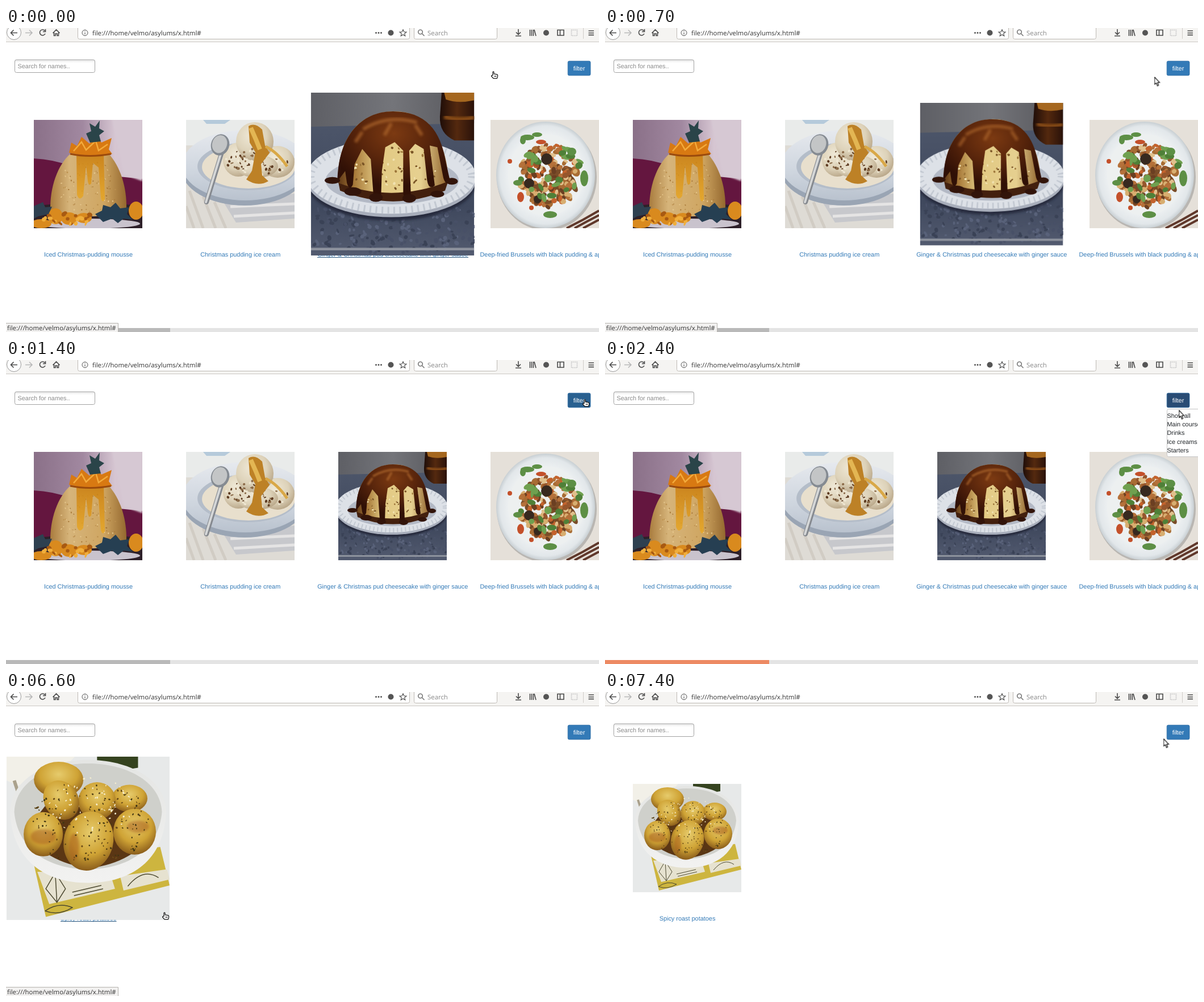
An HTML page for the animation above (8000 ms loop, 1044 px wide and 536 px high).

```html
<!DOCTYPE html>
<html lang="en">
<head>
<meta charset="utf-8">
<title>Recipe gallery</title>
<style>
html, body { margin: 0; width: 100%; height: 100%; overflow: hidden; background: #fff; }
svg { display: block; }
text { font: 10.9px "Liberation Sans", Arial, sans-serif; text-rendering: geometricPrecision; }
.ui { font: 500 11.4px "Open Sans", "Noto Sans", sans-serif; fill: #333; }
.link { fill: #337ab7; }
.mid { text-anchor: middle; }
.icon { fill: none; stroke: #4a4a4a; stroke-width: 1.6; }
.anim { animation: 8s step-end infinite; }

#gallery { animation-name: gallery; }
#result { animation-name: result; }
#status { animation-name: status; }
#menu { animation-name: menu; }
#button { animation-name: button; }
#thumb { animation-name: thumb; }
#cake { animation-name: cake; transform-origin: 680.5px 257.5px; }
#roast { animation-name: roast; transform-origin: 144.5px 257.5px; }
#cakeLine { animation-name: cakeLine; }
#roastLine { animation-name: roastLine; }
#pointer { animation-name: move; }
#hand { animation-name: hand; }
#arrow { animation-name: arrow; }

@keyframes gallery { 0% { opacity: 1 } 80%, 100% { opacity: 0 } }
@keyframes result { 0% { opacity: 0 } 80%, 100% { opacity: 1 } }
@keyframes status { 0% { opacity: 1 } 15% { opacity: 0 } 80% { opacity: 1 } 87.5% { opacity: .5 } 90%, 100% { opacity: 0 } }
@keyframes menu { 0% { opacity: 0 } 22.5% { opacity: 1 } 80%, 100% { opacity: 0 } }
@keyframes button { 0% { fill: #337ab7 } 13.75% { fill: #286090 } 22.5% { fill: #294c74 } 80%, 100% { fill: #337ab7 } }
@keyframes thumb { 0% { fill: #b9b9b9 } 23.75%, 100% { fill: #ed8a63 } }
@keyframes cake {
  0% { transform: scale(1.503) } 3.75% { transform: scale(1.48) } 7.5% { transform: scale(1.43) }
  8.75% { transform: scale(1.316) } 10% { transform: scale(1.12) } 11.25%, 100% { transform: scale(1) }
}
@keyframes roast { 0% { transform: scale(1.503) } 85% { transform: scale(1.073) } 87.5%, 100% { transform: scale(1) } }
@keyframes cakeLine { 0% { opacity: 1 } 3.75%, 100% { opacity: 0 } }
@keyframes roastLine { 0% { opacity: 1 } 85%, 100% { opacity: 0 } }
@keyframes move {
  0% { transform: translate(854px, 76px) }
  3.75% { transform: translate(1019.5px, 66.5px) }
  7.5% { transform: translate(985.5px, 84.5px) }
  8.75% { transform: translate(967.5px, 86.5px) }
  10% { transform: translate(997.5px, 87.5px) }
  11.25% { transform: translate(1022.5px, 86.5px) }
  12.5% { transform: translate(1025.5px, 85.5px) }
  13.75% { transform: translate(1020px, 77px) }
  15% { transform: translate(1018px, 73px) }
  16.25% { transform: translate(1016px, 71px) }
  17.5% { transform: translate(1015px, 69px) }
  27.5% { transform: translate(1013px, 74px) }
  28.75% { transform: translate(1010.5px, 85.5px) }
  30% { transform: translate(1010.5px, 88.5px) }
  80% { transform: translate(152px, 277px) }
  82.5% { transform: translate(275px, 388px) }
  85% { transform: translate(881.5px, 136.5px) }
  90% { transform: translate(956.5px, 99.5px) }
  92.5%, 100% { transform: translate(983.5px, 82.5px) }
}
@keyframes hand {
  0% { opacity: 1 } 3.75% { opacity: 0 } 13.75% { opacity: 1 }
  28.75% { opacity: 0 } 80% { opacity: 1 } 85%, 100% { opacity: 0 }
}
@keyframes arrow {
  0% { opacity: 0 } 3.75% { opacity: 1 } 13.75% { opacity: 0 }
  28.75% { opacity: 1 } 80% { opacity: 0 } 85%, 100% { opacity: 1 }
}
</style>
</head>
<body>
<svg width="1044" height="536" viewBox="0 0 1044 536">
<defs>
  <linearGradient id="wall"><stop stop-color="#8a7088"/><stop offset=".45" stop-color="#a188a0"/><stop offset=".75" stop-color="#d6c6d2"/><stop offset="1" stop-color="#d0bfcb"/></linearGradient>
  <linearGradient id="mousse"><stop stop-color="#a97c3e"/><stop offset=".25" stop-color="#d6b47a"/><stop offset=".7" stop-color="#cfa662"/><stop offset="1" stop-color="#94682f"/></linearGradient>
  <linearGradient id="syrup" x2="0" y2="1"><stop stop-color="#c97d10"/><stop offset="1" stop-color="#e8a826"/></linearGradient>
  <linearGradient id="linen" x2="0" y2="1"><stop offset=".2" stop-color="#4c5569"/><stop offset=".7" stop-color="#3f485d"/><stop offset="1" stop-color="#535b70"/></linearGradient>
  <linearGradient id="shade"><stop stop-color="#5e5f65"/><stop offset=".5" stop-color="#74757a"/><stop offset="1" stop-color="#55555a"/></linearGradient>
  <linearGradient id="jar"><stop stop-color="#1f0d08"/><stop offset=".5" stop-color="#54290f"/><stop offset="1" stop-color="#2a120a"/></linearGradient>
  <linearGradient id="cream"><stop stop-color="#5e3716"/><stop offset=".15" stop-color="#a87a3a"/><stop offset=".35" stop-color="#e2c982"/><stop offset=".75" stop-color="#e6d090"/><stop offset="1" stop-color="#8d5f2a"/></linearGradient>
  <radialGradient id="choc" cx=".5" cy=".25" r=".6"><stop stop-color="#7c3a12"/><stop offset=".5" stop-color="#5a260c"/><stop offset="1" stop-color="#301006"/></radialGradient>
  <radialGradient id="scoop" cx=".4" cy=".35" r=".7"><stop stop-color="#efe8d6"/><stop offset=".6" stop-color="#ddd2b9"/><stop offset="1" stop-color="#b5a284"/></radialGradient>
  <linearGradient id="plate" x2="0" y2="1"><stop stop-color="#e6e9ee"/><stop offset=".6" stop-color="#ced5de"/><stop offset="1" stop-color="#b9c2ce"/></linearGradient>
  <radialGradient id="dish"><stop offset=".7" stop-color="#eff2f3"/><stop offset=".92" stop-color="#e2e7ea"/><stop offset="1" stop-color="#c8cfd3"/></radialGradient>
  <radialGradient id="potato" cx=".5" cy=".35" r=".7"><stop stop-color="#e6cb6c"/><stop offset=".55" stop-color="#cfa335"/><stop offset="1" stop-color="#7d4f16"/></radialGradient>
  <linearGradient id="bowl" x2="0" y2="1"><stop stop-color="#e4e5e3"/><stop offset="1" stop-color="#f2f2f1"/></linearGradient>
  <linearGradient id="field" x2="0" y2="1"><stop stop-color="#e6e6e6"/><stop offset=".25" stop-color="#fff"/></linearGradient>
  <filter id="soft"><feGaussianBlur stdDeviation="1.5"/></filter>
</defs>

<!-- browser bar -->
<path d="M0 0H1044V24H0Z" fill="#f5f4f2"/>
<path d="M0 24.5H1044" stroke="#cbc8c4"/>
<g fill="#fff" stroke="#bdb9b4">
  <rect x="126.500" y="-6.500" width="584" height="26" rx="3"/>
  <rect x="718.500" y="-6.500" width="146" height="26" rx="3"/>
  <circle cx="14" cy="8" r="12.500" stroke="#999"/>
</g>
<g class="icon">
  <path d="M20 8.500H9M13.500 3.500 8.500 8.500 13.500 13.500"/>
  <path d="M34 8.500H45M41 3.500 46 8.500 41 13.500" stroke="#b8b8b8"/>
  <path d="M68.500 5A5 5 0 1 0 69 10M69.500 2V6.500H65"/>
  <path d="M82.500 9 88.500 3 94.500 9M84.500 8V13.500H87V10H90V13.500H92.500V8"/>
  <g stroke-width="1"><circle cx="139" cy="8.500" r="5"/><path d="M139 8V11.500M139 5.500V6.800"/></g>
  <path d="M699 2.800 700.700 6.800 705 7.100 701.700 9.800 702.800 14 699 11.700 695.200 14 696.300 9.800 693 7.100 697.300 6.800Z" stroke-width="1.100"/>
  <g stroke="#777"><circle cx="729.500" cy="7" r="3.800"/><path d="M732.500 10 736.500 14"/></g>
  <path d="M902 2V11M898 7.500 902 11.500 906 7.500M897 14H907"/>
  <path d="M922.500 3V14M925.500 3V14M928.500 3V14M930 3 933 14"/>
  <path d="M971 3.500H982V13H971ZM975.500 3.500V13"/>
  <path d="M995.500 3.500H1005.500V13.500H995.500Z" stroke="#c8c8c8" stroke-dasharray="2 1"/>
  <path d="M1016.500 0V19" stroke="#cfccc8" stroke-width="1"/>
  <path d="M1025.500 5H1035M1025.500 8.700H1035M1025.500 12.400H1035"/>
</g>
<g fill="#555"><circle cx="651.500" cy="8.500" r="1.500"/><circle cx="656" cy="8.500" r="1.500"/><circle cx="660.500" cy="8.500" r="1.500"/><circle cx="677.500" cy="8.500" r="5"/><circle cx="951" cy="8.500" r="5"/></g>
<text class="ui" x="152" y="13">file:///home/velmo/asylums/x.html#</text>
<text class="ui" x="742" y="13" style="fill:#888">Search</text>

<!-- page controls -->
<rect x="15.500" y="56" width="141" height="22.500" rx="3" fill="url(#field)" stroke="#a2a2a2"/>
<text x="20.500" y="71" fill="#8a8a8a">Search for names..</text>
<rect id="button" class="anim" x="989.200" y="58.300" width="39.800" height="25.400" rx="2.500" stroke="#2e6da4" stroke-width=".8"/>
<text class="mid" x="1009" y="75" fill="#fff">filter</text>

<g id="gallery" class="anim">
  <text class="link mid" x="145" y="403">Iced Christmas-pudding mousse</text>
  <text class="link mid" x="412.700" y="403">Christmas pudding ice cream</text>
  <text class="link mid" x="680.700" y="403">Ginger &amp; Christmas pud cheesecake with ginger sauce</text>
  <path id="cakeLine" class="anim" d="M548 404.500H814" stroke="#23527c"/>
  <text class="link" x="834.500" y="403">Deep-fried Brussels with black pudding &amp; apple</text>

  <svg x="49" y="162" width="191" height="191">
    <rect width="191" height="191" fill="url(#wall)"/>
    <path d="M0 68Q35 70 60 80L150 100 191 104V191H0Z" fill="#64163f"/>
    <path d="M138 0H191V108L158 96Z" fill="#d6c8d3" filter="url(#soft)"/>
    <path d="M0 152Q95 140 191 152V191H0Z" fill="#2d2029"/>
    <ellipse cx="95" cy="183" rx="92" ry="9" fill="#c9c3cd"/>
    <path d="M64 60H132C152 82 164 118 163 158Q95 182 29 160C28 118 42 80 64 60Z" fill="url(#mousse)"/>
    <g id="mousseDots"/>
    <path d="M75 58H123L125 140Q121 148 118 138L114 84 104 76 101 112Q97 118 95 108L92 80 87 134Q80 144 76 132Z" fill="url(#syrup)" opacity=".85"/>
    <path d="M62 58 66 40 76 46 84 30 98 42 110 28 119 40 137 32 132 52 138 60Q98 66 62 58Z" fill="#d87912"/>
    <path d="M70 55 84 39 92 53 109 37 114 54 130 43" fill="none" stroke="#f3ab3c" stroke-width="2.500"/>
    <path d="M64 60Q98 67 136 60" fill="none" stroke="#9b4a0c" stroke-width="3"/>
    <path d="M99 40 92 24 101 20 98 6 108 12 116 1 115 15 124 20 115 27 118 38Z" fill="#2a4449"/>
    <g fill="#d98a1e"><ellipse cx="38" cy="170" rx="13" ry="14"/><ellipse cx="62" cy="174" rx="14" ry="11"/><ellipse cx="88" cy="173" rx="14" ry="9"/><ellipse cx="13" cy="183" rx="18" ry="8"/><ellipse cx="180" cy="160" rx="13" ry="16"/></g>
    <g id="fruitDots"/>
    <path d="M108 166 120 160 122 150 135 154 144 146 152 156 168 154 164 166 174 176 158 174 148 182 138 174 122 180Z" fill="#263f52"/>
    <path d="M0 152 16 145 20 154 32 153 26 166 8 170 0 174Z" fill="#2e4050"/>
  </svg>

  <svg x="317" y="162" width="191" height="191">
    <rect width="191" height="191" fill="#dedbd5"/>
    <path d="M0 0H191V45H0Z" fill="#e9ebea"/>
    <path d="M30 0H78L68 7H36Z" fill="#b5cadb"/>
    <path d="M6 125 30 191M30 135 52 191M50 145 70 191M0 152 14 191" stroke="#d1ccc4" stroke-width="5"/>
    <path d="M64 142 191 130V174L88 181Z" fill="#c7c8cc"/>
    <path d="M78 153 191 148M84 170 191 164" stroke="#e5e4e4" stroke-width="5"/>
    <ellipse cx="103" cy="85" rx="112" ry="66" fill="#9aa5b4"/>
    <ellipse cx="104" cy="80" rx="111" ry="62" fill="url(#plate)"/>
    <ellipse cx="108" cy="82" rx="88" ry="42" fill="#b4bdc9"/>
    <ellipse cx="110" cy="83" rx="82" ry="38" fill="#e8dfcd"/>
    <g fill="url(#scoop)"><ellipse cx="92" cy="70" rx="27" ry="30"/><ellipse cx="161" cy="74" rx="30" ry="28"/><ellipse cx="125" cy="82" rx="37" ry="20"/><ellipse cx="121" cy="38" rx="33" ry="34"/></g>
    <g id="iceDots"/>
    <path d="M110 11Q121 4 134 17L139 45 147 58 132 78 134 98 145 108Q126 119 106 105L116 90 122 57 112 40Z" fill="#bd8126"/>
    <path d="M114 14 124 37 130 52" fill="none" stroke="#e3b653" stroke-width="8"/>
    <path d="M140 47Q160 56 178 82" fill="none" stroke="#d9a847" stroke-width="5"/>
    <path d="M63 57 36 145" stroke="#85898f" stroke-width="8" stroke-linecap="round"/>
    <path d="M62 57 35 145" stroke="#d5d7d8" stroke-width="4" stroke-linecap="round"/>
    <ellipse cx="60" cy="44" rx="16" ry="19" fill="#858b92" transform="rotate(18 60 44)"/>
    <ellipse cx="59" cy="43" rx="13" ry="16" fill="#c3c5c6" transform="rotate(18 60 43)"/>
  </svg>

  <svg x="853" y="162" width="191" height="191">
    <rect width="191" height="191" fill="#e5e0d9"/>
    <ellipse cx="99" cy="101" rx="88" ry="94" fill="#b9b6b2"/>
    <ellipse cx="97" cy="97" rx="87" ry="94" fill="url(#dish)"/>
    <ellipse cx="98" cy="97" rx="67" ry="72" fill="#edf0f0"/>
    <g fill="#c4502a"><ellipse cx="89" cy="39" rx="9" ry="4"/><circle cx="34" cy="73" r="4"/><ellipse cx="53" cy="136" rx="6" ry="9"/><circle cx="72" cy="155" r="4"/><circle cx="147" cy="76" r="4"/></g>
    <g id="saladBase"/>
    <g id="saladDots"/>
    <g fill="#37291f"><circle cx="99" cy="69" r="10"/><circle cx="68" cy="112" r="9"/><circle cx="83" cy="140" r="7"/></g>
    <g id="saladLeaves"/>
    <g fill="#5d8f45"><ellipse cx="65" cy="31" rx="12" ry="5"/><ellipse cx="57" cy="36" rx="5" ry="7"/><ellipse cx="82" cy="26" rx="9" ry="4"/><ellipse cx="105" cy="167" rx="12" ry="6"/><ellipse cx="165" cy="103" rx="7" ry="14"/><ellipse cx="143" cy="56" rx="8" ry="7"/><ellipse cx="48" cy="111" rx="8" ry="5"/></g>
    <path d="M134 191 163 176 191 160M148 191 170 179 191 168M163 191 191 176" stroke="#60382b" stroke-width="4" fill="none"/>
  </svg>

  <g id="cake" class="anim"><svg x="585" y="162" width="191" height="191">
    <rect width="191" height="191" fill="url(#linen)"/>
    <path d="M0 0H191V36L0 40Z" fill="url(#shade)"/>
    <path d="M153 0H191V56H168Q150 48 151 28Z" fill="url(#jar)"/>
    <path d="M156 0H191V9Q172 13 158 8Z" fill="#a5671f"/>
    <path d="M156 28Q172 34 191 29" fill="none" stroke="#8a4d18" stroke-width="5" filter="url(#soft)"/>
    <g id="linenDots"/>
    <path d="M0 183.500H191" stroke="#8d929d" stroke-width="3"/>
    <ellipse cx="94" cy="106" rx="99" ry="44" fill="#252c3c" filter="url(#soft)"/>
    <ellipse cx="94" cy="102" rx="99" ry="44" fill="#a8aebb"/>
    <ellipse cx="94" cy="98" rx="99" ry="44" fill="#dde1e7"/>
    <ellipse cx="94" cy="98" rx="94" ry="40" fill="none" stroke="#c3c9d2" stroke-width="8" stroke-dasharray="2 5"/>
    <ellipse cx="95" cy="103" rx="78" ry="28" fill="#b3b9c5"/>
    <path d="M31 100Q96 92 162 100L157 115Q97 140 34 115Z" fill="#43200e"/>
    <path d="M32 106C30 62 50 24 95 22S160 62 161 104Q97 130 32 106Z" fill="url(#cream)"/>
    <g id="cakeDots"/>
    <path d="M31 104C32 52 58 22 96 22S152 44 158 82L163 104Q158 110 155 100L148 64 139 62 145 109Q138 115 136 103L132 66 122 60 115 68 117 121Q110 129 108 118L108 68 98 58 87 64 83 92 82 123Q75 130 73 119L70 78 60 66 51 84 49 108Q45 116 42 106L40 92Z" fill="url(#choc)"/>
    <g fill="none" stroke="#b26a2d" stroke-width="4" opacity=".65" filter="url(#soft)"><path d="M61 43Q90 25 124 35M52 58 60 46M86 50 94 36M130 50 122 38"/></g>
    <g fill="#32140a"><ellipse cx="25" cy="103" rx="9" ry="4"/><ellipse cx="49" cy="116" rx="10" ry="5"/><ellipse cx="76" cy="123" rx="8" ry="5"/><ellipse cx="115" cy="124" rx="8" ry="5"/><ellipse cx="148" cy="119" rx="8" ry="4"/><ellipse cx="165" cy="104" rx="7" ry="4"/></g>
  </svg></g>

  <path d="M0 529H1044V536H0Z" fill="#e4e4e4"/>
  <path id="thumb" class="anim" d="M0 529H289V536H0Z"/>
</g>

<g id="result" class="anim">
  <text class="link mid" x="145" y="403">Spicy roast potatoes</text>
  <path id="roastLine" class="anim" d="M96 404.500H194.500" stroke="#23527c"/>
  <g id="roast" class="anim"><svg x="49" y="162" width="191" height="191">
    <rect width="191" height="191" fill="#e7e9e9"/>
    <path d="M0 0H80L68 12 14 34 0 28Z" fill="#f2f0e8"/>
    <path d="M106 0H154V13Q130 18 106 8Z" fill="#35431f"/>
    <path d="M9 28 16 50" stroke="#aaa18c" stroke-width="4"/>
    <path d="M31 122 46 188 191 151 180 106Z" fill="#cdb53f"/>
    <path d="M36 135 50 173 127 155 121 136ZM133 140 137 157 191 144 188 132Z" fill="#e6e2d0"/>
    <path d="M46 155 57 136 69 155 59 171ZM57 136 59 171M77 159 111 151M79 163 113 155M142 152Q160 130 178 142M45 181Q61 170 77 177 61 187 45 181" fill="none" stroke="#4c4930"/>
    <path d="M4 66C4 -17 187 -17 187 66C184 121 147 148 95 148S7 120 4 66Z" fill="url(#bowl)"/>
    <path d="M9 65C12 -11 178 -11 182 65C178 108 143 132 95 132S13 107 9 65Z" fill="#cfd0cb"/>
    <path d="M22 88 45 58 145 60 172 88Q150 124 97 131 45 124 22 88Z" fill="#5a3614"/>
    <g fill="url(#potato)">
      <ellipse cx="61" cy="27" rx="29" ry="21"/><ellipse cx="144" cy="49" rx="21" ry="16"/>
      <ellipse cx="106" cy="52" rx="22" ry="22"/><ellipse cx="64" cy="51" rx="20" ry="24" transform="rotate(-30 64 51)"/>
      <ellipse cx="43" cy="91" rx="23" ry="26"/><ellipse cx="150" cy="88" rx="25" ry="27"/>
      <ellipse cx="96" cy="99" rx="29" ry="35" transform="rotate(14 96 99)"/>
    </g>
    <g fill="#a65a1d" opacity=".5" filter="url(#soft)"><ellipse cx="43" cy="94" rx="15" ry="9"/><ellipse cx="154" cy="82" rx="13" ry="7"/><ellipse cx="79" cy="106" rx="6" ry="16"/></g>
    <g id="herbs"/><g id="salt"/>
  </svg></g>
</g>

<g id="menu" class="anim">
  <rect x="989.500" y="86.500" width="122" height="84" rx="3" fill="#fff" stroke="#c4c4c4"/>
  <g fill="#212529"><text x="989.500" y="101.500">Show all</text><text x="989.500" y="117">Main courses</text><text x="989.500" y="132">Drinks</text><text x="989.500" y="147.500">Ice creams</text><text x="989.500" y="163">Starters</text></g>
</g>

<g id="status" class="anim">
  <path d="M-1 520.500H197.500V537H-1Z" fill="#f2f1f0" stroke="#b5b2ae"/>
  <text class="ui" x="2" y="533">file:///home/velmo/asylums/x.html#</text>
</g>

<g id="pointer" class="anim" stroke="#111" stroke-width="1.200" fill="#fff" stroke-linejoin="round">
  <path id="arrow" class="anim" d="M0 0V13L3 10.400 5 15.300 7.200 14.400 5.200 9.700H9Z"/>
  <path id="hand" class="anim" d="M3 7.500V1.500Q4 .200 5 1.500V4.800L10.500 5.800Q12 6.500 11.500 9.500L10.500 12.800H4L.600 9Q.500 7 3 7.500ZM6.500 8V10M8.500 8V10"/>
</g>
</svg>
<script>
// Seeded specks spread over an ellipse
function scatter(id, count, colours, [cx, cy, rx, ry], size, seed) {
  const random = () => (seed = seed * 16807 % 2147483647) / 2147483647;
  const group = document.getElementById(id);
  for (let i = 0; i < count; i++) {
    const angle = random() * Math.PI * 2, reach = Math.sqrt(random());
    const x = cx + Math.cos(angle) * reach * rx, y = cy + Math.sin(angle) * reach * ry;
    const speck = document.createElementNS(group.namespaceURI, 'ellipse');
    const attributes = {
      cx: x, cy: y, rx: size * (.6 + random() * .7), ry: size * (.4 + random() * .6),
      fill: colours[i % colours.length], transform: `rotate(${random() * 180} ${x} ${y})`
    };
    for (const name in attributes) speck.setAttribute(name, attributes[name]);
    group.append(speck);
  }
}
scatter('mousseDots', 90, ['#a87838', '#e6c78d', '#bd9250'], [96, 118, 54, 46], 1.3, 11);
scatter('fruitDots', 24, ['#f0ae3c', '#a85a12'], [62, 174, 46, 11], 4, 17);
scatter('iceDots', 70, ['#5e3c22', '#efe7d3', '#8a6a48'], [126, 74, 58, 24], 2.4, 29);
scatter('saladBase', 60, ['#7a4d28', '#a86c34'], [102, 98, 50, 52], 8, 41);
scatter('saladDots', 140, ['#b5713a', '#d8ae70', '#6b3f22', '#e0c08c', '#96562c', '#c4622c'], [102, 98, 52, 56], 5, 47);
scatter('saladLeaves', 26, ['#4f8038', '#6fa04f'], [107, 97, 60, 58], 7, 53);
scatter('linenDots', 260, ['#3a4256', '#59627a', '#485067'], [95, 158, 125, 30], 2.5, 59);
scatter('cakeDots', 70, ['#9b7438', '#f1e2b0', '#7a5526'], [96, 88, 55, 25], 1.5, 61);
scatter('herbs', 150, ['#4d3c14', '#6b4c19', '#3f3513'], [97, 77, 70, 50], 1.1, 83);
scatter('salt', 60, ['#f7efd0'], [98, 58, 50, 34], 1.1, 97);
</script>
</body>
</html>
```
